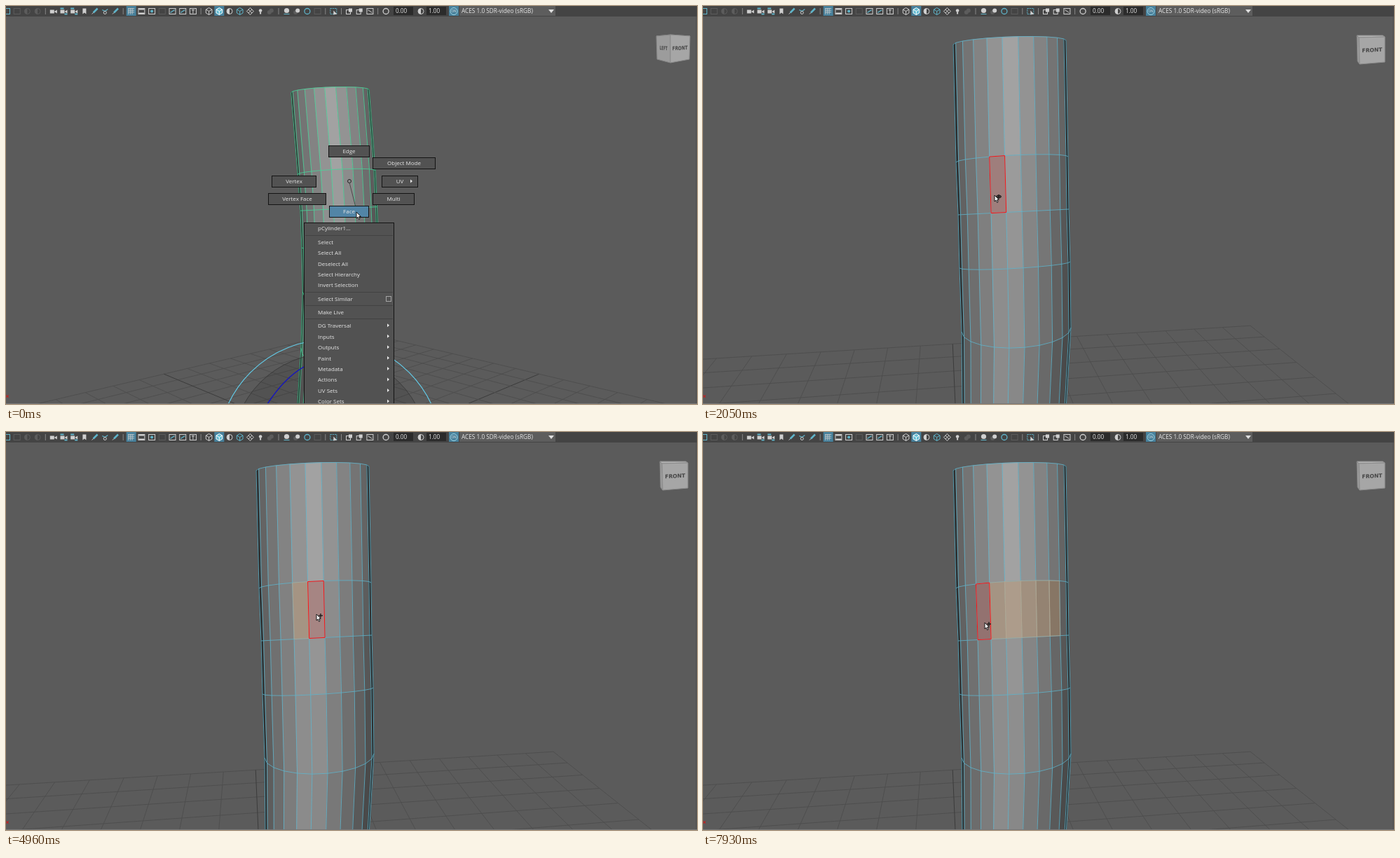
These frames come from a looping animation (986 by 568 pixels, 8 s). An HTML page with a canvas:

```html
<!DOCTYPE html>
<html lang="en">
<head>
<meta charset="utf-8">
<title>Face selection</title>
<style>
html, body { margin: 0; width: 100%; height: 100%; overflow: hidden; background: #5b5b5b; }
canvas { display: block; }
</style>
</head>
<body>
<canvas id="stage" width="986" height="568"></canvas>
<script>
const g = document.getElementById('stage').getContext('2d');
const TAU = Math.PI * 2, RAD = Math.PI / 180;
const UI = '"Open Sans", "Noto Sans", sans-serif';
const TEAL = '#5fb4c9', LIGHT = '#cfcfcf', DIM = '#5c5c5c';

// Cylinder rings, zoomed in: [leftX, leftY, rightX, rightY, bulge].
const RINGS = [[357, 55, 518, 49, -8], [361, 223, 521, 215, -6], [364, 298, 522, 290, 0],
               [366, 374, 524, 365, 5], [369, 465, 525, 459, 26], [370, 580, 518, 575, 42]];
// Floor: corner, two edges as [across, depth], camera height, horizon.
const FLOOR = {
  turned: [-520, .7, 520, .543, 520, -.543, 280, 237],
  far: [-471, 1, 721, .15, 150, -.752, 368, 106],
  near: [-471, .748, 721, .12, 115, -.752, 304, 106]
};
// View cube: top row, then bottom row.
const CUBE = {
  turned: [[928, 43], [948, 41], [976, 43], [929, 76], [948, 81], [975, 76]],
  front: [[933, 42], [936, 45], [973, 44], [934, 79], [937, 83], [973, 80]]
};
// Screen refreshes: [first, last, count].
const SPANS = [[0, 0, 1], [140, 1090, 8], [1230, 2050, 7], [2720, 2720, 1], [3000, 3420, 4], [3690, 3820, 2],
  [4250, 4670, 4], [4960, 5340, 4], [5650, 5800, 2], [6360, 6940, 5], [7500, 7500, 1], [7780, 7930, 2]];
// Pointer path: [time, x, y].
const POINTER = [[0, 500, 294], [680, 513, 293], [1230, 544, 316], [1640, 564, 330], [2050, 416, 270],
  [3000, 416, 270], [3690, 430, 258], [4670, 430, 258], [4960, 443, 260], [5340, 463, 259], [5650, 466, 259],
  [5800, 489, 259], [6360, 489, 259], [6940, 501, 259], [7500, 501, 259], [7930, 402, 272]];
// When each face, from column 4 on, becomes selected.
const PICKED = [3000, 5200, 5650, 6360, 7500];

const clamp = v => Math.max(0, Math.min(1, v));
const mix = (a, b, f) => Array.isArray(a) ? a.map((v, i) => mix(v, b[i], f)) : a + (b - a) * f;

function snap(t) {
  const [first, last, n] = SPANS.filter(s => s[0] <= t).pop();
  if (n === 1) return first;
  const gap = (last - first) / (n - 1);
  return first + gap * Math.min(n - 1, Math.floor((t - first + 5) / gap));
}
function pointerAt(t) {
  const i = POINTER.findIndex(p => p[0] > t);
  if (i < 0) return POINTER[POINTER.length - 1].slice(1);
  const [a, b] = [POINTER[i - 1], POINTER[i]];
  return mix(a, b, (t - a[0]) / (b[0] - a[0])).slice(1);
}

function path(pts, close) {
  g.beginPath();
  pts.forEach(p => g.lineTo(p[0], p[1]));
  if (close) g.closePath();
}
function line(color, width, ...pts) {
  g.strokeStyle = color; g.lineWidth = width;
  path(pts); g.stroke();
}
function poly(fill, pts, edge) {
  path(pts, true);
  if (fill) { g.fillStyle = fill; g.fill(); }
  if (edge) { g.strokeStyle = edge; g.lineWidth = 1; g.stroke(); }
}
function rect(fill, x, y, w, h, edge) {
  g.fillStyle = fill; g.fillRect(x, y, w, h);
  if (edge) { g.strokeStyle = edge; g.lineWidth = 1; g.strokeRect(x + .5, y + .5, w - 1, h - 1); }
}
function arc(color, width, x, y, rx, ry = rx, from = 0, to = TAU, tilt = 0) {
  g.beginPath(); g.ellipse(x, y, rx, ry, tilt, from, to);
  g.strokeStyle = color; g.lineWidth = width; g.stroke();
}
function disc(color, x, y, r) {
  g.beginPath(); g.arc(x, y, r, 0, TAU); g.fillStyle = color; g.fill();
}
function text(s, x, y, size = 8, align = 'left', color = '#e6e6e6') {
  g.font = size + 'px ' + UI; g.textAlign = align; g.textBaseline = 'alphabetic';
  g.fillStyle = color; g.fillText(s, x, y + size * .36);
}

// Toolbar icons, drawn around (0, 0).
const hexagon = r => Array.from({ length: 6 }, (_, i) => [r * Math.sin(i * TAU / 6), -r * Math.cos(i * TAU / 6)]);
const ICON = {
  box(c) { g.strokeStyle = c; g.lineWidth = 1; g.strokeRect(-4.5, -4, 9, 8); },
  dot(c) { ICON.box(LIGHT); disc(c, 0, 0, 2); },
  film(c) { ICON.box(c); line(c, 2, [-4, -3], [4, -3]); line(c, 2, [-4, 3], [4, 3]); },
  type(c) { ICON.box(c); line(c, 1, [-2, -2], [2, -2]); line(c, 1, [0, -2], [0, 3]); },
  fit(c) { ICON.box(LIGHT); line(c, 1.5, [-3, 2], [3, -2]); },
  grid(c) {
    for (let i = -4; i <= 4; i += 2.67) {
      line(c, .8, [i, -4.5], [i, 4.5]); line(c, .8, [-4.5, i], [4.5, i]);
    }
  },
  cam(c) { rect(c, -5, -2, 6, 5); poly(c, [[1, .5], [5, -2], [5, 3]]); },
  lens(c) { ICON.cam(LIGHT); rect(c, -5, -5, 5, 2); rect(c, 1, 3, 4, 2); },
  mark(c) { poly(c, [[-2.5, -4], [2.5, -4], [2.5, 4], [0, 2], [-2.5, 4]]); },
  pen(c) { line(c, 2.5, [4, -4], [-2, 2]); line(LIGHT, 1, [-2, 2], [-4, 4]); },
  curve(c) { line(c, 1.2, [-4, -2], [0, 0], [4, -3]); arc(LIGHT, 1, 0, 2, 2); },
  cube(c) {
    poly(null, hexagon(5), c);
    line(c, 1, [-4.3, -2.5], [0, 0], [4.3, -2.5]); line(c, 1, [0, 0], [0, 5]);
  },
  solid(c) { poly(c, hexagon(5)); ICON.cube('#ffffff'); },
  ring(c) { arc(c, 1.3, 0, 0, 4); },
  half(c) { arc(c, 1, 0, 0, 4); g.beginPath(); g.arc(0, 0, 4, TAU / 4, TAU * .75); g.fillStyle = c; g.fill(); },
  check(c) { poly(null, [[0, -5], [5, 0], [0, 5], [-5, 0]], c); line(c, 1, [-2.5, -2.5], [2.5, 2.5]); line(c, 1, [2.5, -2.5], [-2.5, 2.5]); },
  bulb(c) { disc(c, 0, -1, 2.3); rect(c, -1, 1, 2, 3); },
  ball(c) { disc(c, 0, -1, 3.6); line(TEAL, 1, [-4, 4], [4, 4]); },
  pair(c) { disc(DIM, -2, 1.5, 3); disc(c, 1, -1, 3); },
  pick(c) { g.setLineDash([2, 1]); ICON.box(c); g.setLineDash([]); poly(LIGHT, [[0, -1], [5, 4], [0, 5]]); },
  stack(c) { g.strokeStyle = c; g.lineWidth = 1; g.strokeRect(-4.5, -2, 6, 6); rect(c, -1, -4, 5, 5); },
  slash(c) { ICON.box(c); line(c, 1, [-3, -2], [3, 2]); }
};
// A trailing * means teal, - means disabled, ! means active.
const TOOLS = 'box* box- half- half- | cam lens* lens* mark pen* curve* pen* | grid! film dot* box- fit* fit* type | '
  + 'cube solid! half cube* check bulb pair- | ball pair ring* box- | pick* | stack stack slash | ring';
const TINT = { '*': TEAL, '-': DIM };

function icon(name, x) {
  g.save();
  g.translate(x, 7.5);
  if (name.endsWith('!')) rect('#47809b', -7, -7.5, 14, 14);
  ICON[name.replace(/\W/, '')](name === 'solid!' ? '#62bcd2' : TINT[name.slice(-1)] || LIGHT);
  g.restore();
}
function field(s, x) {
  rect('#2b2b2b', x, 1, 28, 12);
  text(s, x + 3, 7.5, 8.2);
}
function toolbar() {
  rect('#444444', 0, 0, 986, 15);
  let x = 1;
  for (const name of TOOLS.split(' ')) {
    if (name === '|') {
      rect('#858585', x - 4, 3, 1, 9);
      x += 8;
    } else {
      icon(name, x);
      x += 14.7;
    }
  }
  icon('half', 592);
  field('0.00', 553);
  field('1.00', 600);
  rect('#47809b', 632, 0, 14, 14);
  arc('#9fd6e4', 1, 639, 7.5, 5);
  text('ON', 639, 7.5, 4.5, 'center');
  rect('#5d5d5d', 647, 0, 137, 14);
  text('ACES 1.0 SDR-video (sRGB)', 650, 7.5, 8.25);
  poly('#dddddd', [[774, 5], [782, 5], [778, 10]]);
}

function floorGrid([x0, d0, ux, ud, vx, vd, height, horizon]) {
  const at = (s, t) => {
    const d = d0 + ud * s + vd * t;
    return [493 + (x0 + ux * s + vx * t) / d, horizon + height / d];
  };
  const nearest = .9;
  for (let i = 0; i <= 20; i++) {
    const s = i / 20, color = i === 10 ? '#383838' : '#4d4d4d';
    line(color, .9, at(s, 0), at(s, nearest));
    if (s <= nearest) line(color, .9, at(0, s), at(1, s));
  }
}

// Zooming scales the cylinder about a fixed point; turning makes it lean.
function cylinderPoints(turn, zoom, spin) {
  const [a, b] = RINGS.slice(-2);
  const below = b.map((v, i) => v + (v - a[i]) * (i % 2 ? 1.3 : .6));
  const scale = mix(.694, 1, zoom);
  return [...RINGS, below].map(([xl, yl, xr, yr, bulge]) => Array.from({ length: 12 }, (_, i) => {
    const angle = i ? Math.min(90, spin + 16.3 * i) * RAD : -TAU / 4;
    const f = (Math.sin(angle) + 1) / 2;
    const y = 292 + (mix(yl, yr, f) + bulge * Math.cos(angle) - 292) * scale;
    const lean = 18 * turn * Math.cos((y - 350) * .0047);
    return [490 + (mix(xl, xr, f) - 490) * scale + lean, y - 4 * turn];
  }));
}
function shade(col, row) {
  const angle = 16.3 * (col - 5);
  const v = Math.abs(angle) > 75 ? 46 : 162 - 4.2 * row - .95 * Math.abs(angle + 2.5 * row);
  return `rgb(${v},${v},${v})`;
}
function cylinder(p, wire, picked, hover) {
  const face = (c, r) => [p[r][c], p[r][c + 1], p[r + 1][c + 1], p[r + 1][c]];
  for (let r = 0; r < 6; r++)
    for (let c = 0; c < 11; c++) poly(shade(c, r), face(c, r), shade(c, r));
  for (let i = 0; i < 12; i++) line(wire, .8, ...p.map(r => r[i]));
  p.forEach(r => line(wire, .8, ...r));
  for (let c = 4; c < 4 + picked; c++) poly('rgba(255,160,70,.18)', face(c, 1), 'rgba(190,165,140,.55)');
  if (hover >= 0) poly('rgba(200,70,60,.25)', face(hover, 1), '#ff1414');
}

function viewCube([tl, tm, tr, bl, bm, br], turn) {
  poly('#b4b4b4', [tl, tm, tr, [tr[0] - 3, tl[1]]], '#8c8c8c');
  poly('#9c9c9c', [tl, tm, bm, bl], '#858585');
  poly('#a6a6a6', [tm, tr, br, bm], '#8c8c8c');
  const label = (s, a, b, c, d) => {
    g.save();
    g.transform((b[0] - a[0]) / 37, (b[1] - a[1] + d[1] - c[1]) / 74, 0, 1,
      (a[0] + b[0] + c[0] + d[0]) / 4, (a[1] + b[1] + c[1] + d[1]) / 4 + .5);
    g.font = 'bold 7.6px "DejaVu Sans", sans-serif';
    g.textAlign = 'center'; g.textBaseline = 'middle'; g.fillStyle = '#454545';
    g.fillText(s, 0, 0);
    g.restore();
  };
  label('FRONT', tm, tr, bm, br);
  if (turn > .3) label('LEFT', tl, tm, bl, bm);
}

function gizmo(x, y) {
  disc('rgba(0,0,0,.1)', x, y, 140);
  arc('#3c3c3c', 1, x, y, 140);
  arc('#62cbe8', 1.2, x, y, 160);
}
function rotator(hot) {
  gizmo(419, 254);
  arc('#1010c8', 1.4, 419, 254, 140, 140, 141 * RAD, 322.5 * RAD);
  arc('#1fe01f', 1.2, 419, 257.5, 140, 20, 0, Math.PI, -RAD);
  arc(hot ? '#ffff86' : '#f01c1c', 1.3, 423, 254, 15, 140, -TAU / 4, TAU / 4, -1.6 * RAD);
}

function button(s, x, y, w, fill = '#525252') {
  rect(fill, x, y, w, 17, '#141414');
  text(s, x + w / 2, y + 8.5, 8, 'center');
}
const arrow = (x, y) => poly('#e6e6e6', [[x, y - 2.5], [x + 3, y], [x, y + 2.5]]);

const MENU = ['pCylinder1...', '', 'Select', 'Select All', 'Deselect All', 'Select Hierarchy', 'Invert Selection', '',
  'Select Similar', '', 'Make Live', '', 'DG Traversal>', 'Inputs>', 'Outputs>', 'Paint>', 'Metadata>', 'Actions>',
  'UV Sets>', 'Color Sets>'];

function menu() {
  arc('#222222', 1, 490, 250, 2.5);
  line('#4a4a4a', 1, [490, 252], [501, 295]);
  button('Edge', 460, 199, 59);
  button('Object Mode', 523, 216, 90);
  button('Vertex', 379, 242, 64);
  button('UV', 536, 242, 52);
  arrow(577, 250);
  button('Vertex Face', 374, 267, 83);
  button('Multi', 523, 267, 60);
  button('Face', 461, 285, 57, '#5285a6');
  rect('#525252', 425, 309, 129, 270, '#141414');
  let y = 317.5;
  for (const item of MENU) {
    if (!item) {
      rect('#424242', 427, Math.round(y - 6), 125, 1);
      y += 3.8;
      continue;
    }
    text(item.replace('>', ''), 445, y);
    if (item.endsWith('>')) arrow(544, y - .5);
    if (item === 'Select Similar') rect('#525252', 542, Math.round(y - 4), 8, 8, '#a5a5a5');
    y += 15.45;
  }
}

function pointer([x, y], badge) {
  const ink = '#161616';
  if (badge === '-') line(ink, 1, [x - 2, y - .5], [x + 3, y - .5]);
  if (badge === '+' || badge === 'x') {
    line(ink, 1.3, [x + 3, y + 2], [x + 9, y + 2]);
    line(ink, 1.3, [x + 6, y - 1], [x + 6, y + 5]);
  }
  if (badge === 'x') arc(ink, 1, x + 6, y + 2, 3.5, 2);
  g.save();
  g.translate(x, y);
  poly('#f4f4f4', [[0, 0], [0, 9], [2, 7.2], [3.5, 10.5], [5, 9.8], [3.6, 6.7], [6.3, 6.5]], ink);
  g.restore();
}

function draw(now) {
  const t = snap(now), opening = t < 140;
  const turn = 1 - clamp((t - 140) / 540);
  const u = clamp((t - 680) / 1090);
  const zoom = u * (1.2 - .2 * u), glide = zoom * (2 - zoom);
  const rotating = t >= 3000 && now < 4400;
  const mouse = pointerAt(t);
  const picked = PICKED.filter(p => p <= now).length;

  const points = cylinderPoints(turn, zoom, -86 - 3 * Math.max(turn, glide));
  const under = points[1].findIndex((p, i) => i < 11 && (p[0] + points[2][i][0]) / 2 < mouse[0]
    && (points[1][i + 1][0] + points[2][i + 1][0]) / 2 > mouse[0]);
  const taken = under >= 4 && under < 4 + picked;
  const hover = t >= 2050 && !rotating && !taken ? under : -1;
  const badge = t >= 4960 ? '+' : t >= 2050 && t < 2720 ? 'x' : t >= 140 && t < 1770 ? '-' : '';

  rect('#5b5b5b', 0, 0, 986, 568);
  floorGrid(mix(mix(FLOOR.far, FLOOR.near, glide), FLOOR.turned, turn));
  cylinder(points, opening ? '#48d69b' : '#60b5cd', picked, hover);
  viewCube(mix(CUBE.front, CUBE.turned, turn), turn);
  if (opening) {
    gizmo(462, 636);
    g.beginPath(); g.moveTo(373, 568); g.quadraticCurveTo(397, 531, 425, 515);
    g.strokeStyle = '#1010c8'; g.lineWidth = 1.4; g.stroke();
    menu();
  }
  if (rotating) rotator(t >= 3690);
  line('#d01818', 1, [0, 555], [4, 559]);
  line('#d01818', 1, [0, 559], [4, 555]);
  rect('#535353', 984, 15, 2, 553);
  rect('#777777', 0, 567, 986, 1);
  toolbar();
  pointer(mouse, badge);
}

const start = performance.now();
function frame(now) {
  draw(Math.max(0, now - start) % 8000);
  requestAnimationFrame(frame);
}
draw(0);
requestAnimationFrame(frame);
</script>
</body>
</html>
```
